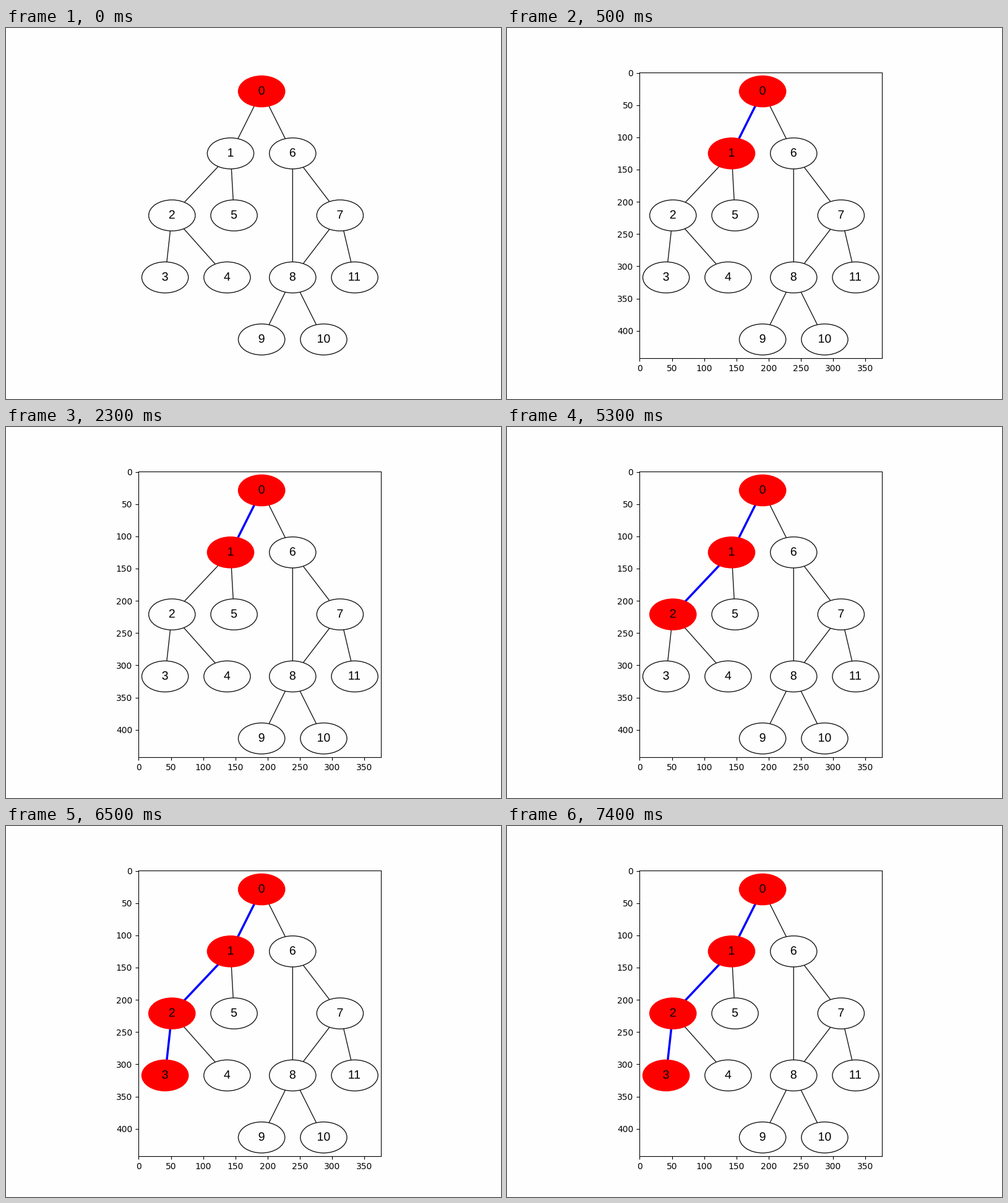
Write a matplotlib script that moves like this. It is 800 px wide and 600 px high and loops after 8000 ms.

```python
import matplotlib.pyplot as plt
from matplotlib.animation import FuncAnimation
from matplotlib.patches import Ellipse, PathPatch
from matplotlib.textpath import TextPath
from matplotlib.transforms import Affine2D

W, H, DPI = 800, 600, 100
INTERVAL = 500
FRAMES = 16
FRAMES_PER_STEP = 6

PAPER, INK = "#fefefe", "#181818"
GAP = 72          # points between siblings and between rows
SCALE = 1.393     # pixels per point
FONT_PX = 19.5
DIGIT_WIDTH = 0.556 * FONT_PX

# parent: (sideways shift of the children in points, children)
TREE = {
    0: (0, (1, 6)), 1: (-32, (2, 5)), 2: (28, (3, 4)),
    6: (55, (7,)), 7: (-19, (8, 11)), 8: (0, (9, 10)),
}
EDGES = [(p, c) for p, (_, kids) in TREE.items() for c in kids] + [(6, 8)]


def layout():
    """Centre each group of siblings below its parent, plus the shift."""
    spots = {0: (413.1, 102.5)}
    for parent, (shift, kids) in TREE.items():
        x, y = spots[parent]
        for i, kid in enumerate(kids):
            dx = shift + GAP * (i - (len(kids) - 1) / 2)
            spots[kid] = x + dx * SCALE, y + GAP * SCALE
    return spots


def add_label(ax, text, x, y):
    glyphs = TextPath((0, 0), text, size=FONT_PX,
                      prop={"family": "Liberation Sans"})
    left = x - DIGIT_WIDTH * len(text) / 2
    flip = Affine2D().scale(1, -1).translate(left, y + 5.2)
    ax.add_patch(PathPatch(glyphs.transformed(flip), fc="black", lw=0, zorder=3))


fig = plt.figure(figsize=(W / DPI, H / DPI), dpi=DPI, facecolor=PAPER)

# Image-style axes with pixel ticks
plot = fig.add_axes([0.125, 0.11, 0.775, 0.77], facecolor=PAPER)
plot.set(xlim=(-0.5, 375.5), ylim=(442.5, -0.5), aspect="equal",
         xticks=range(0, 351, 50), yticks=range(0, 401, 50))
plot.tick_params(labelsize=10, labelfontfamily="DejaVu Sans")

# Tree layer in stage pixels
tree = fig.add_axes([0, 0, 1, 1])
tree.set(xlim=(0, W), ylim=(H, 0))
tree.axis("off")

spots = layout()
edges, nodes = {}, {}
for a, b in EDGES:
    xs, ys = zip(spots[a], spots[b])
    edges[a, b], = tree.plot(xs, ys, zorder=1, snap=False)
for n, (x, y) in spots.items():
    nodes[n] = tree.add_patch(
        Ellipse((x, y), 54 * SCALE, 36 * SCALE, lw=1, zorder=2, snap=False))
    add_label(tree, str(n), x, y)


def draw(frame):
    # Nodes are numbered in the order of the search
    step = (frame + FRAMES_PER_STEP - 1) // FRAMES_PER_STEP
    plot.set_visible(step > 0)
    for n, oval in nodes.items():
        seen = n <= step
        oval.set_facecolor("red" if seen else PAPER)
        oval.set_edgecolor("red" if seen else INK)
    for (a, b), line in edges.items():
        walked = b <= step
        line.set_color("blue" if walked else INK)
        line.set_linewidth(2.5 if walked else 1)
    return [*nodes.values(), *edges.values()]


anim = FuncAnimation(fig, draw, frames=FRAMES, interval=INTERVAL,
                     repeat=True, repeat_delay=0, blit=False)
plt.show()
```
